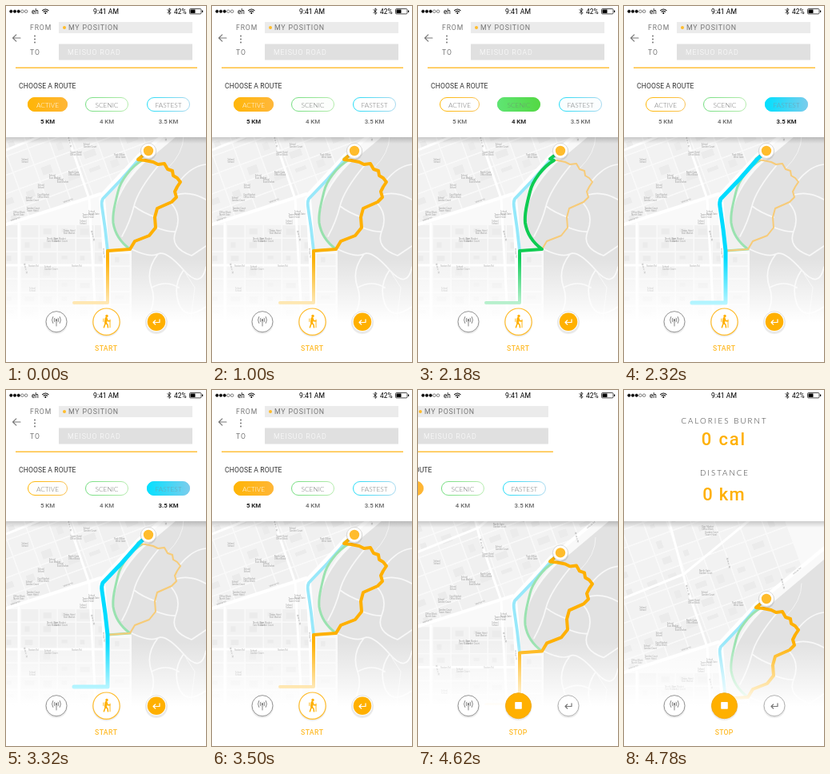
These frames come from a looping animation (250x445 px, 5.78 s). An HTML page:

```html
<!DOCTYPE html>
<html lang="en">
<head>
<meta charset="utf-8">
<title>Route picker</title>
<style>
html, body { margin: 0; width: 100%; height: 100%; overflow: hidden; background: #fff; }
svg { display: block; width: 100%; height: 100%; }
.din { font-family: Roboto, "Liberation Sans", sans-serif; }
.geo { font-family: Lato, "Open Sans", sans-serif; font-weight: 300; }
.tiny { font: 2.6px "Noto Sans", "Noto Sans CJK SC", sans-serif; fill: #999; }
.line { fill: none; stroke-linecap: round; stroke-linejoin: round; }
</style>
</head>
<body>
<svg id="stage" viewBox="0 0 250 445"></svg>
<script>
const ORANGE = '#ffb000', SOFT = '#ffbc2c', GREY = '#777';
const LOOP = 5780, STEP = 20;

let seed = 11;
const rand = () => (seed = (seed * 16807) % 2147483647) / 2147483647;
const pick = list => list[Math.floor(rand() * list.length)];
const repeat = (n, make) => Array.from({ length: n }, (_, i) => make(i)).join('');

const rect = (x, y, w, h, fill, more = '') =>
  `<rect x="${x}" y="${y}" width="${w}" height="${h}" fill="${fill}" ${more}/>`;
const disc = (x, y, r, fill, more = '') =>
  `<circle cx="${x}" cy="${y}" r="${r}" fill="${fill}" ${more}/>`;
const line = (d, color, width, more = '') =>
  `<path class="line" d="${d}" stroke="${color}" stroke-width="${width}" ${more}/>`;
const text = (x, y, str, size, fill, gap = 0, more = '', face = 'din') =>
  `<text class="${face}" x="${x}" y="${y}" font-size="${size}" fill="${fill}" letter-spacing="${gap}" ${more}>${str}</text>`;
const centred = (x, y, str, size, fill, gap = 0, more = '', face) =>
  text(x + gap / 2, y, str, size, fill, gap, 'text-anchor="middle" ' + more, face);
const gradient = (id, from, to) =>
  `<linearGradient id="${id}"><stop stop-color="${from}"/><stop offset="1" stop-color="${to}"/></linearGradient>`;
const fade = (id, color, a, b) =>
  `<linearGradient id="${id}" x2="0" y2="1"><stop stop-color="${color}" stop-opacity="${a}"/>
   <stop offset="1" stop-color="${color}" stop-opacity="${b}"/></linearGradient>`;

const TRUNK = 'L127 371H85';
const routes = [
  { name: 'ACTIVE', dist: '5 KM', x: 27, w: 50, color: ORANGE, pale: '#f7cb79', thin: 2,
    ends: ['#ffb505', '#ffb637'], edge: ['#ffb703', '#f9c357'], ink: '#fff',
    path: 'M178 181L165 192L174 193L184 195L190 198L198 197L202 204L208 206L209 212L214 215L218 220L214 226L211 232L213 239L207 245L198 249L189 253L186 264L187 277L179 287L161 294L155 304L127 306' },
  { name: 'SCENIC', dist: '4 KM', x: 99, w: 54, color: '#0bcc50', pale: '#9ae2b0', thin: 3,
    ends: ['#5be470', '#4fd73f'], edge: ['#74dd80', '#b5ecae'], ink: '#6b9a70',
    path: 'M178 181L165 191L170 193C156 201 143 219 140 232C136 248 133 260 134 271C136 284 144 296 155 304L127 306' },
  { name: 'FASTEST', dist: '3.5 KM', x: 176, w: 54, color: '#00dcff', pale: '#98e8fa', thin: 3.8,
    ends: ['#00e0ff', '#7accec'], edge: ['#25dcf7', '#a7d9ef'], ink: '#6f9eae',
    path: 'M178 181L166 192L144 217L121 241Q119 245 120 251L124 279L127 306' }
];

// Map
const blocks = (x, y, cols, rows, w, h) => repeat(cols * rows, i => {
  const bx = x + (i % cols) * w, by = y + Math.floor(i / cols) * h;
  const lot = rand() < .5 ? rect(bx + w * .2, by + h * .25, w * (.2 + rand() * .35), h * (.2 + rand() * .3), '#ebebeb') : '';
  return rect(bx, by, w - 1.6, h - 1.6, pick(['#f0f0f0', '#f2f2f2', '#f3f3f3'])) + lot;
});
const places = ['Garden Court', 'Tower Hotel', 'East Market', 'Office Block', 'School', 'North Gate'];
const label = (x, y, str, turn = 0) =>
  `<text class="tiny" transform="translate(${x} ${y}) rotate(${turn})">${str}</text>`;
const spot = () => {
  const x = 4 + rand() * 100, y = 90 + rand() * 270;
  return label(x, y, pick(places)) + label(x, y + 3, pick(places));
};
const column = (x, y) => [...'城东大道'].map((c, i) => label(x + i * .8, y + i * 3.2, c)).join('');

const city = `
  ${rect(0, 60, 250, 390, '#f9f9f9')}
  <g clip-path="url(#upper)"><g transform="rotate(-20 0 275)">${blocks(-80, 40, 12, 11, 28, 22)}</g></g>
  <g clip-path="url(#lower)">${blocks(-4, 274, 6, 8, 23, 17)}</g>
  ${blocks(131, 310, 1, 5, 25, 16)}
  <path d="M120 243L168 195Q136 232 134 268Q137 292 154 304L129 305Z" fill="#f1f1f1"/>
  ${line('M0 273L118 235', '#fff', 4)}${line('M120 236L166 187L250 118', '#fff', 4.5)}
  ${line('M50 60L78 165L104 241L112 390M0 180L75 150L160 80M16 272V400M0 324H126', '#fff', 3)}
  ${line('M120 242Q126 300 127 420', '#fff', 8)}
  <path d="M188 184L250 132V450H157V306Q133 287 134 268Q137 232 172 197Z" fill="#e2e2e2"/>
  ${line('M157 304Q180 315 190 310T222 330T250 326M190 200Q165 230 160 250T145 288M213 236Q230 231 250 242M207 247Q220 262 212 282T232 312L250 300M188 277Q204 283 212 282M217 219Q232 200 250 198M190 310Q174 330 182 352T170 400M222 330Q208 350 216 372T250 376M182 352Q200 342 216 352M187 264Q170 258 160 250', '#f8f8f8', 1.7)}
  ${line('M202 203Q222 184 222 162M222 330L236 352L230 400', '#f4f4f4', 1)}
  ${repeat(22, spot)}
  ${label(72, 246, 'Market Rd', -19)}${label(6, 269, 'Market Rd', -19)}${label(212, 151, 'Hillside Rd', -40)}
  ${label(121, 303, 'Bridge Rd', 84)}${label(28, 326, 'Station Rd')}${label(82, 326, 'Station Rd')}
  ${label(135, 187, 'Park Office')}${label(137, 190, 'West Gate')}
  ${column(77, 166)}${column(22, 324)}${column(106, 283)}${column(196, 158)}${column(128, 132)}`;

const map = `<g clip-path="url(#view)"><g id="map">${city}
  ${[2, 1, 0].map(i => line(routes[i].path, routes[i].pale, routes[i].thin)).join('')}
  ${routes.map((r, i) => line(r.path + TRUNK, r.color, i == 2 ? 5 : 4, `data-on="${i}"`)).join('')}
  ${disc(178, 182.5, 10.3, '#000', 'opacity=".1"')}
  ${disc(178, 181, 9.5, '#fff', 'stroke="#d2d2d2" stroke-width=".8"')}${disc(178, 181, 6.2, SOFT)}
  </g>${rect(0, 315, 250, 80, 'url(#mist)')}${rect(0, 394.5, 250, 51, '#fff')}</g>`;

// Header
const pill = (r, i) => {
  const mid = r.x + r.w / 2, shape = 'rx="8.5"', on = `data-on="${i}"`, off = `data-off="${i}"`;
  const name = (ink, more) => centred(mid, 126.6, r.name, 8.3, ink, 0, more, 'geo');
  const dist = (ink, more) => centred(mid, 146.8, r.dist, 7.8, ink, 0, more);
  return rect(r.x + .5, 114.5, r.w - 1, 17, '#fff', `${shape} stroke="url(#edge${i})"`) +
    rect(r.x, 114, r.w, 18, `url(#fill${i})`, `rx="9" ${on}`) +
    name(GREY, off) + name(r.ink, on) +
    dist('#666', off + ' font-weight="500"') + dist('#222', on + ' font-weight="600"');
};

const header = `${rect(0, 163, 250, 9, 'url(#shade)')}${rect(0, 0, 250, 164, '#fff')}
  <g id="picker">
    ${line('M18 40H8.5M12.8 35.8L8.5 40L12.8 44.2', '#777', 1.1)}
    ${text(30, 30.2, 'FROM', 8.6, GREY, .9)}${text(30, 60.7, 'TO', 8.6, GREY, .9)}
    ${repeat(3, i => disc(36, 37.5 + i * 4, 1, '#777'))}
    ${rect(66, 20, 167, 14, '#ebebeb')}${disc(73, 27, 2, SOFT)}
    ${text(78, 30.2, 'MY POSITION', 8.8, GREY, .8)}
    ${rect(66, 47.5, 167, 20, '#e0e0e0')}${text(77, 60.7, 'MEISUO ROAD', 8.8, '#fff', .9, 'font-weight="300"')}
    ${rect(12, 76.5, 227, 1.4, SOFT)}
    ${text(16, 102.7, 'CHOOSE A ROUTE', 8.6, '#333', .1)}
    ${routes.map(pill).join('')}
  </g>
  <g id="stats">
    ${centred(124.5, 41.5, 'CALORIES BURNT', 9.7, '#333', 2.1, '', 'geo')}
    ${centred(124, 69.3, '0 cal', 22, ORANGE, 1.8, 'font-weight="500"')}
    ${centred(125, 107, 'DISTANCE', 9.7, '#333', 2, '', 'geo')}
    ${centred(124.5, 137.5, '0 km', 22, ORANGE, 1.3, 'font-weight="500"')}
  </g>`;

const status = `
  ${repeat(5, i => disc(6.3 + i * 4.7, 6.7, 1.75, i < 3 ? '#000' : 'none', 'stroke="#000" stroke-width=".5"'))}
  ${text(32, 9.6, 'eh', 8.2, '#000')}
  ${line('M45.6 5.6Q49.3 2.4 53 5.6M47 7.2Q49.3 5.3 51.6 7.2', '#000', 1.1)}${disc(49.3, 8.8, 1.1, '#000')}
  ${centred(125, 9.7, '9:41 AM', 8.6, '#000')}
  ${line('M202 4.6L206 8.6L204 10.4V2.8L206 4.6L202 8.6', '#000', .8)}
  ${text(210, 9.6, '42%', 8.4, '#000')}
  ${rect(229.5, 3.5, 14.5, 6.4, 'none', 'rx="1.2" stroke="#000" stroke-width=".7"')}
  ${rect(230.5, 4.5, 6, 4.4, '#000')}${rect(245, 5.5, 1.2, 2.4, '#000')}`;

// Bottom controls
const button = (x, r, fill, edge, width = 1) => disc(x, 396, r + 1, '#000', 'opacity=".08"') +
  disc(x, 394.7, r, fill, `stroke="${edge}" stroke-width="${width}"`);
const back = color => line('M192 391.8V395.5H184M186.6 393L184 395.5L186.6 398', color, 1.2);
const controls = `
  ${button(63, 13, '#fff', '#888', .9)}
  ${disc(63, 392.5, 1.3, '#777')}
  ${line('M63 393.5V400M60.8 390.2Q59.4 392.5 60.8 394.8M65.2 390.2Q66.6 392.5 65.2 394.8M58.7 388.5Q56.2 392.5 58.7 396.5M67.3 388.5Q69.8 392.5 67.3 396.5', '#777', .9)}
  <g data-idle="1">
    ${button(125.5, 16.7, '#fff', SOFT, 1.2)}
    ${disc(126, 387.5, 1.7, ORANGE)}
    ${line('M125.2 390.5L124.6 395.5', ORANGE, 3.2)}
    ${line('M124.4 396L122.4 401.8M125 396L127 398.5L127.5 401.8M126 391L127.5 393.8H129.8', ORANGE, 1.5)}
    ${line('M130 392V401.8M121.8 391V394.5', ORANGE, .9)}
    ${button(188, 13, '#fff', '#ddd', .8)}${disc(188, 394.7, 11.3, ORANGE)}${back('#fff')}
    ${centred(125, 431, 'START', 8.7, SOFT, .4, 'font-weight="500"')}
  </g>
  <g data-run="1">
    ${button(125.5, 16, ORANGE, '#f4aa10')}${rect(121.2, 390.1, 8.6, 8.6, '#fff', 'rx=".6"')}
    ${button(188, 13, '#fff', '#aaa', .9)}${back('#777')}
    ${centred(125, 431, 'STOP', 8.7, SOFT, .2, 'font-weight="500"')}
  </g>`;

const stage = document.getElementById('stage');
stage.innerHTML = `<defs>
  ${routes.map((r, i) => gradient('fill' + i, ...r.ends) + gradient('edge' + i, ...r.edge)).join('')}
  ${fade('mist', '#fff', 0, 1)}${fade('shade', '#000', .2, 0)}
  <clipPath id="view"><rect y="160" width="250" height="285"/></clipPath>
  <clipPath id="upper"><path d="M0 60H250V120L166 190L118 235L0 275Z"/></clipPath>
  <clipPath id="lower"><path d="M0 275L118 235L124 270L126 450H0Z"/></clipPath>
  </defs>${map}${header}${status}${controls}`;

const [mapEl, picker, stats] = ['map', 'picker', 'stats'].map(id => document.getElementById(id));
const all = key => [...stage.querySelectorAll(`[data-${key}]`)];
const on = all('on'), off = all('off'), idle = all('idle'), run = all('run');
const move = (el, x, y = 0) => el.setAttribute('transform', `translate(${x} ${y})`);
const show = (el, amount) => el.setAttribute('opacity', amount);

const clamp = v => Math.max(0, Math.min(1, v));

// cubic-bezier(.42, 0, 1, 1), solved by bisection
function easeIn(t, from, length) {
  const u = clamp((t - from) / length);
  let lo = 0, hi = 1;
  for (let i = 0; i < 24; i++) {
    const s = (lo + hi) / 2, r = 1 - s;
    if (1.26 * r * r * s + 3 * r * s * s + s ** 3 < u) lo = s; else hi = s;
  }
  const s = u === 0 || u === 1 ? u : lo;
  return 3 * (1 - s) * s * s + s ** 3;
}

function draw(t) {
  const a = easeIn(t, 980, 200), b = easeIn(t, 2160, 160), c = easeIn(t, 3300, 200);
  const chosen = [1 - a + c, a - b, b - c];
  on.forEach(el => show(el, chosen[el.dataset.on]));
  off.forEach(el => show(el, 1 - chosen[el.dataset.off]));

  const p = easeIn(t, 4480, 300), swap = clamp(p / .27);
  move(mapEl, 0, 80 * p);
  move(picker, -250 * p);
  move(stats, 250 * (1 - p));
  idle.forEach(el => show(el, 1 - swap));
  run.forEach(el => show(el, swap));
}

const start = performance.now();
function tick() {
  const t = (performance.now() - start) % LOOP;
  draw(Math.floor(t / STEP) * STEP);
  requestAnimationFrame(tick);
}
tick();
</script>
</body>
</html>
```
